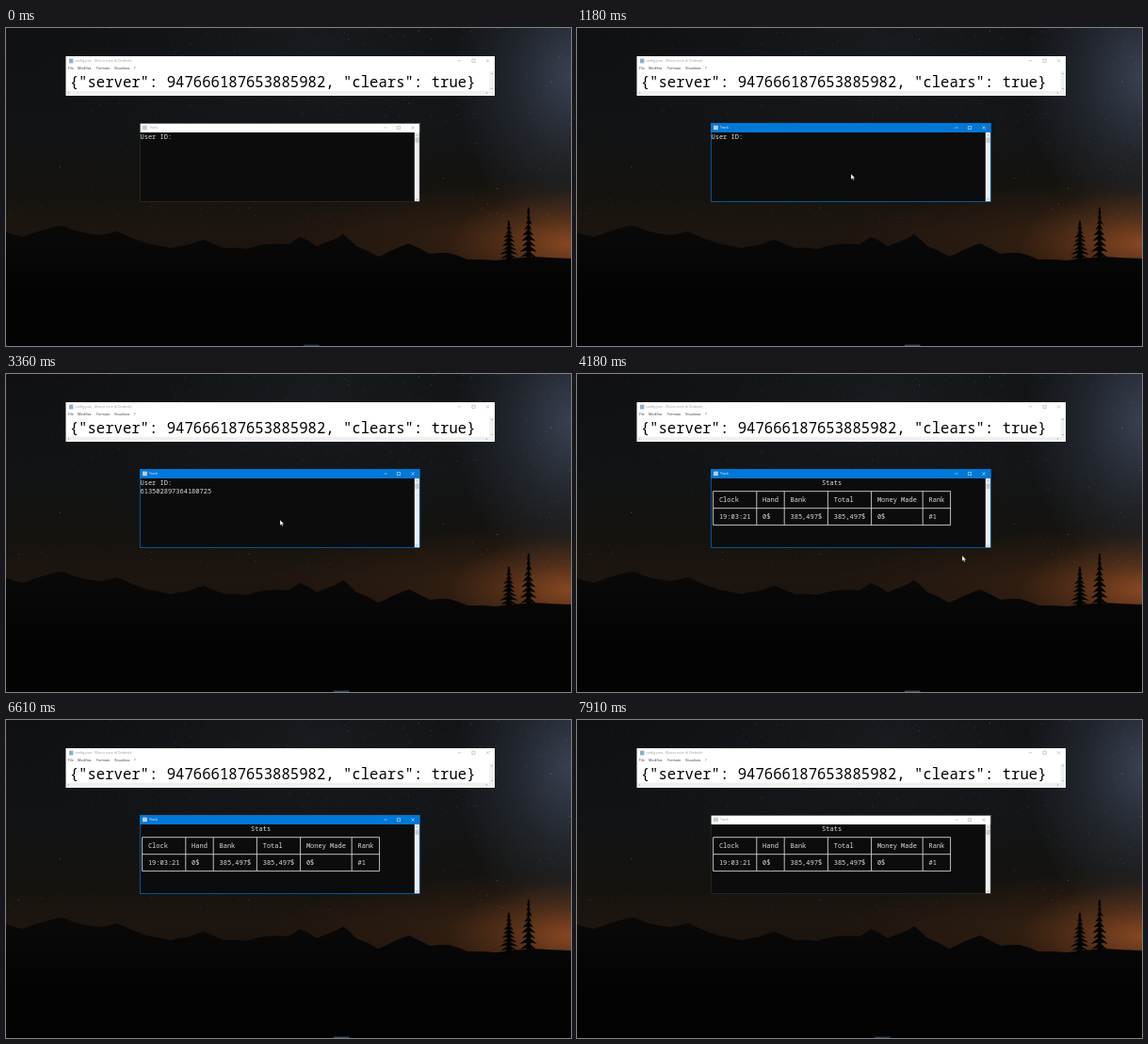
Recreate the animation shown at these times as an HTML page with a canvas. Size 600 by 338 pixels, loop 7.94 s.

```html
<!DOCTYPE html>
<html lang="it">
<head>
<meta charset="utf-8">
<title>Console stats</title>
<style>
html, body { margin: 0; width: 100%; height: 100%; overflow: hidden; background: #050606; }
canvas, svg { position: absolute; left: 0; top: 0; width: 600px; height: 338px; }
text { white-space: pre; }
.ui { font: 3.6px "Open Sans", "Noto Sans", sans-serif; }
.note { font: 15.62px "Noto Sans Mono", monospace; fill: #000; }
.con { font: 7px "Noto Sans Mono", monospace; fill: #dedede; }
.grid { fill: none; stroke: #d4d4d4; stroke-width: .9; }
.btn { fill: none; stroke-width: .5; }
</style>
</head>
<body>
<canvas id="sky" width="600" height="338"></canvas>
<svg id="ui" viewBox="0 0 600 338"></svg>
<script>
const LOOP = 7940;
const CELL = 4.2, LEFT = 142.5;
const USER_ID = '613502897364180725';

// ---- Night landscape ----
const ctx = document.getElementById('sky').getContext('2d');

let seed = 41;
function rand() {
  seed = (seed * 16807) % 2147483647;
  return seed / 2147483647;
}

function fade(y0, y1, stops) {
  const g = ctx.createLinearGradient(0, y0, 0, y1);
  stops.forEach(([at, color]) => g.addColorStop(at, color));
  return g;
}

function glow(x, y, rx, ry, rgb, alpha) {
  ctx.save();
  ctx.translate(x, y);
  ctx.scale(rx, ry);
  const g = ctx.createRadialGradient(0, 0, 0, 0, 0, 1);
  g.addColorStop(0, `rgba(${rgb},${alpha})`);
  g.addColorStop(.5, `rgba(${rgb},${alpha * .38})`);
  g.addColorStop(1, `rgba(${rgb},0)`);
  ctx.fillStyle = g;
  ctx.fillRect(-1, -1, 2, 2);
  ctx.restore();
}

function stars(count) {
  for (let i = 0; i < count; i++) {
    const x = 600 * Math.pow(rand(), .75), y = 205 * Math.pow(rand(), 1.2);
    const size = rand() < .04 ? 1.1 : .7;
    ctx.fillStyle = `rgba(190,200,212,${.05 + .3 * Math.pow(rand(), 3)})`;
    ctx.fillRect(x, y, size, size);
  }
}

function ridge(points, fill) {
  ctx.beginPath();
  ctx.moveTo(0, 338);
  points.forEach(([x, y], i) => {
    ctx.lineTo(x, y);
    const next = points[i + 1];
    if (next) ctx.lineTo((x + next[0]) / 2, (y + next[1]) / 2 + rand() * 2 - 1);
  });
  ctx.lineTo(600, 338);
  ctx.fillStyle = fill;
  ctx.fill();
}

function tree(x, top, base, half) {
  ctx.fillStyle = '#050505';
  ctx.fillRect(x - .8, top, 1.6, base - top);
  const tiers = 10, step = (base - top) / tiers;
  for (let i = 0; i < tiers; i++) {
    const y = top + i * step, w = half * (.16 + .84 * i / tiers);
    ctx.beginPath();
    ctx.moveTo(x, y - 1);
    ctx.lineTo(x + w * (.7 + .4 * rand()), y + step * 1.1);
    ctx.lineTo(x + w * .3, y + step * .9);
    ctx.lineTo(x, y + step * 1.5);
    ctx.lineTo(x - w * .3, y + step * .9);
    ctx.lineTo(x - w * (.7 + .4 * rand()), y + step * 1.1);
    ctx.fill();
  }
}

ctx.fillStyle = fade(0, 250, [[0, '#0e1012'], [.4, '#111315'], [.7, '#15130f'], [.86, '#1d150f'], [1, '#1c130d']]);
ctx.fillRect(0, 0, 600, 338);
glow(330, 20, 300, 150, '44,50,56', .32);
glow(600, 50, 125, 170, '74,84,106', .7);
glow(600, 226, 330, 66, '104,56,24', .5);
glow(600, 230, 130, 58, '176,92,44', .62);
stars(1500);

ridge([[0, 217], [18, 222], [45, 213], [61, 210], [80, 217], [100, 220], [118, 216], [150, 229],
  [175, 234], [192, 231], [210, 225], [232, 234], [255, 235], [275, 230], [300, 230], [312, 222],
  [330, 232], [345, 226], [358, 219], [372, 232], [395, 243], [410, 236], [428, 229], [450, 240],
  [470, 239], [490, 246], [520, 247], [560, 243], [600, 245]],
  fade(210, 290, [[0, '#090909'], [.5, '#060606'], [1, '#030303']]));
tree(534, 205, 249, 13);
tree(555, 191, 249, 12);

// ---- Desktop panels ----
const rect = (x, y, w, h, fill, extra = '') =>
  `<rect x="${x}" y="${y}" width="${w}" height="${h}" fill="${fill}" ${extra}/>`;
const text = (x, y, str, cls, fill) =>
  `<text x="${x}" y="${y}" class="${cls}"${fill ? ` fill="${fill}"` : ''}>${str}</text>`;
const path = (d, stroke, cls = 'btn') => `<path d="${d}" class="${cls}" stroke="${stroke}"/>`;
const con = (col, row, str) => text(LEFT + col * CELL, 118.4 + row * 9, str, 'con');

const buttons = (xs, y, color) => path(
  `M${xs[0] - 1.7} ${y}h3.4M${xs[1] - 1.6} ${y - 1.6}h3.2v3.2h-3.2z` +
  `M${xs[2] - 1.6} ${y - 1.6}l3.2 3.2m0 -3.2l-3.2 3.2`, color);

function editor() {
  const menu = [[66, 'File'], [76, 'Modifica'], [96, 'Formato'], [115, 'Visualizza'], [136, '?']];
  return rect(63.5, 30, 455.5, 42, '#fff') +
    rect(67, 32.6, 4.4, 4.8, '#8fb0c4') +
    text(73, 36.3, 'config.json - Blocco note di Ombrale', 'ui', '#999') +
    buttons([481.5, 496.5, 511.5], 34.8, '#999') +
    menu.map(([x, name]) => text(x, 44.4, name, 'ui', '#333')).join('') +
    rect(513.5, 46, 5, 21, '#f0f0f0') +
    rect(64, 66.7, 454.5, 4.8, '#f0f0f0') +
    path('M515 49l1 -1l1 1M515 64l1 1l1 -1M67 68l-1 1l1 1M510 68l1 1l-1 1', '#8a8a8a') +
    text(67.7, 62.6, '{"server": 947666187653885982, "clears": true}', 'note');
}

function titleBar(back, ink, edge) {
  return rect(142, 101, 297.5, 10, back) +
    rect(142.3, 101.3, 296.9, 83.3, 'none', `stroke="${edge}" stroke-width=".7"`) +
    rect(145, 103.6, 4.8, 4.6, '#c4cbd0') +
    text(152, 107.4, 'Track', 'ui', ink) +
    buttons([403, 417, 432], 106, ink);
}

function table() {
  const edges = [.5, 11.5, 18.5, 29.5, 40.5, 53.5, 60.5].map(c => LEFT + c * CELL);
  const cells = [[2, 'Clock', '19:03:21'], [13, 'Hand', '0$'], [20, 'Bank', '385,497$'],
    [31, 'Total', '385,497$'], [42, 'Money Made', '0$'], [55, 'Rank', '#1']];
  const lines = [124.7, 142.7, 160.6].map(y => `M${edges[0]} ${y}H${edges[6]}`)
    .concat(edges.map(x => `M${x} 124.7V160.6`)).join('');
  return con(28, 0, 'Stats') + path(lines, '#d4d4d4', 'grid') +
    cells.map(([c, head, value]) => con(c, 2, head) + con(c, 4, value)).join('');
}

const group = (id, body) => `<g id="${id}">${body}</g>`;

document.getElementById('ui').innerHTML =
  editor() +
  rect(142, 101, 297.5, 84, '#0c0c0c') +
  rect(433.8, 111, 5.4, 73.6, '#f0f0f0') +
  rect(434.3, 116.5, 4.4, 5.6, '#cdcdcd') +
  path('M435.5 114.4l1 -1l1 1M435.5 181.5l1 1l1 -1', '#606060') +
  group('idle', titleBar('#fff', '#999', '#303030') + rect(316, 336.6, 16.5, 1.4, '#263c4e')) +
  group('active', titleBar('#0078d7', '#fff', '#0078d7') + rect(348, 336.6, 16.5, 1.4, '#3a4c5a')) +
  group('prompt', con(0, 0, 'User ID:')) +
  group('entry', con(0, 1, USER_ID)) +
  group('caret', rect(LEFT + 18 * CELL + .3, 127, 4, 1.7, '#f2f2f2')) +
  group('stats', table()) +
  group('mouse', '<path d="M0 0V5.9L1.4 4.7L2.4 6.8L3.3 6.4L2.4 4.4H4.2Z" fill="#fff" stroke="#111" stroke-width=".3"/>');

// ---- Motion ----
function play(id, frames) {
  document.getElementById(id).animate(frames, { duration: LOOP, iterations: Infinity });
}

// Hard switch: one opacity between two times, the other outside them
function show(id, from, to, inside = 1) {
  const key = (at, opacity) => ({ offset: at / LOOP, opacity, easing: 'step-end' });
  const outside = 1 - inside;
  const start = from > 0 ? [key(0, outside)] : [];
  play(id, [...start, key(from, inside), key(to, outside), key(LOOP, outside)]);
}

show('active', 900, 7700);
show('idle', 900, 7700, 0);
show('prompt', 0, 3400);
show('entry', 1960, 3400);
show('caret', 1960, 2900);
show('stats', 3400, LOOP);

const moves = [[0, 606, 150], [150, 606, 150], [780, 291, 155], [3450, 291, 155], [4120, 409, 193],
  [4180, 409, 193], [4800, 426, 203], [5950, 426, 203], [6450, 606, 190], [LOOP, 606, 190]];
play('mouse', moves.map(([at, x, y]) => ({
  offset: at / LOOP, transform: `translate(${x}px, ${y}px)`, easing: 'ease-in-out'
})));
</script>
</body>
</html>
```
